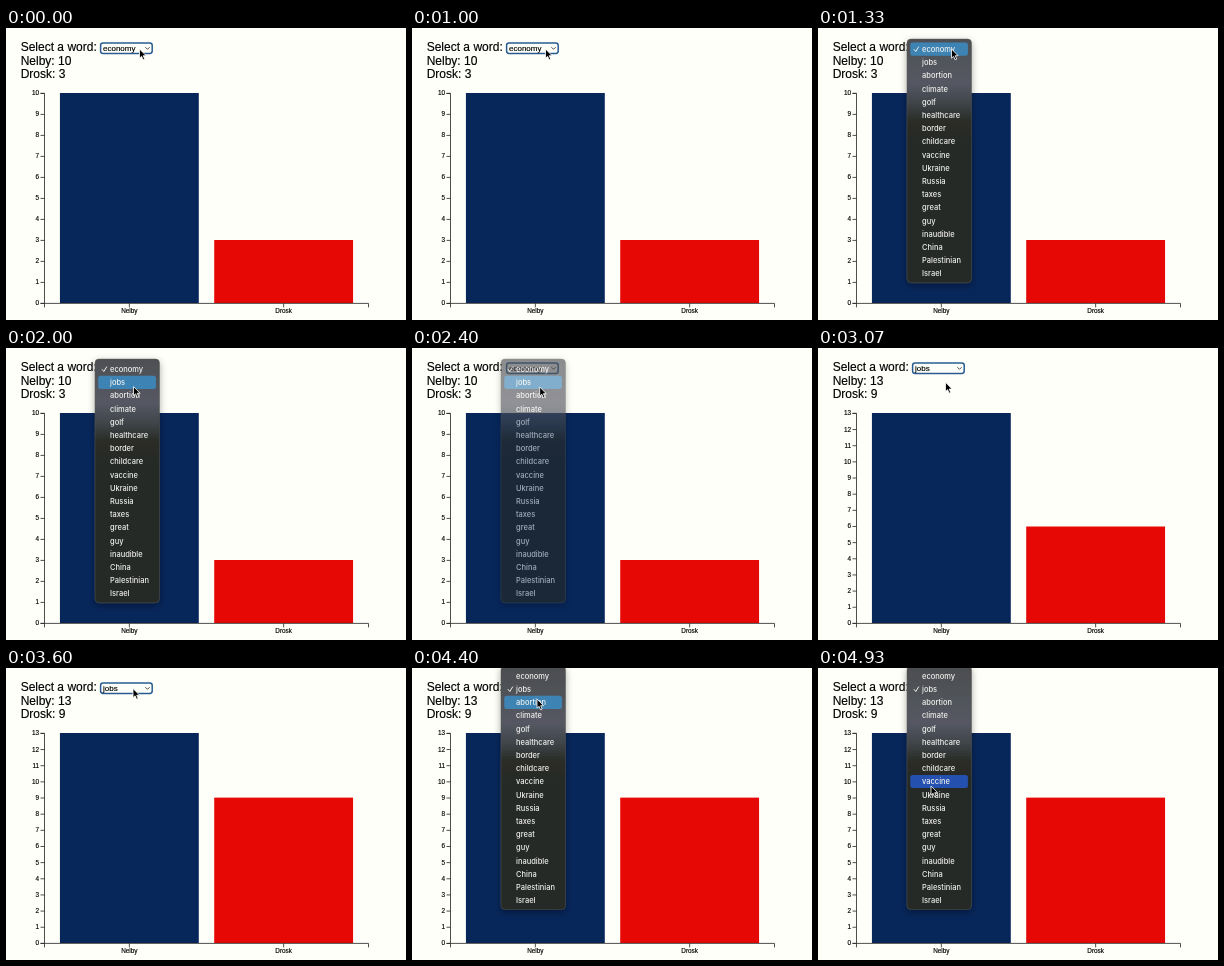
An HTML page for the animation above (4.99 s loop, 400 by 292 pixels).

```html
<!DOCTYPE html>
<html lang="en">
<head>
<meta charset="utf-8">
<title>Word counts</title>
<style>
  html, body { margin: 0; width: 100%; height: 100%; overflow: hidden; background: #fffffa; }
  svg { display: block; width: 400px; height: 292px; font-family: "Liberation Sans", Arial, sans-serif; }
  text { stroke: currentColor; stroke-width: .15; }
  .axis { font-size: 6.4px; }
  .line { fill: none; stroke: #222; stroke-width: .8; }
  .menu { font: 500 7.5px Inter, sans-serif; fill: #f1f1ee; }
  .menu text { stroke: none; }
</style>
</head>
<body>
<svg id="stage" viewBox="0 0 400 292">
  <defs>
    <linearGradient id="glass" gradientUnits="userSpaceOnUse" x1="0" y1="0" x2="0" y2="110">
      <stop offset="0" stop-color="#4c4e50"/>
      <stop offset=".5" stop-color="#555863"/>
      <stop offset=".68" stop-color="#40454a"/>
      <stop offset=".84" stop-color="#2a2d27"/>
      <stop offset="1" stop-color="#282a25"/>
    </linearGradient>
    <linearGradient id="glow" gradientUnits="userSpaceOnUse" x1="0" y1="45" x2="0" y2="100">
      <stop offset="0" stop-color="#3d84b4"/>
      <stop offset="1" stop-color="#2450b0"/>
    </linearGradient>
    <filter id="shadow" x="-30%" y="-10%" width="160%" height="120%">
      <feDropShadow dx="0" dy="2.5" stdDeviation="3.5" flood-color="#000" flood-opacity=".35"/>
    </filter>
  </defs>
</svg>
<script>
const LOOP = 4990, FRAME = 1000 / 15;
const BASE = 275, HEIGHT = 210, LEFT = 38.5, WIDTH = 324;
const LINE_Y = BASE + .4;
const ROW = 13.2;
const NAMES = ["Nelby", "Drosk"];
const WORDS = ["economy", "jobs", "abortion", "climate", "golf", "healthcare", "border",
  "childcare", "vaccine", "Ukraine", "Russia", "taxes", "great", "guy", "inaudible",
  "China", "Palestinian", "Israel"];
const COUNTS = [[10, 3], [13, 9]];
const PICKED = 2600, GROW = 1000;
const MENUS = [
  { word: 0, open: 1130, fade: 2330, close: 2530 },
  { word: 1, open: 3870, fade: LOOP, close: LOOP + 1 }
];
// time, x, y of the pointer tip
const PATH = [
  [0, 133.5, 21], [1530, 133.5, 21], [1930, 127.5, 38.5], [2530, 127.7, 39], [2870, 127.7, 39],
  [3470, 127, 20.5], [4070, 127, 20.5], [4400, 125, 31], [4730, 122, 46], [4930, 113, 118]
];

const stage = document.getElementById("stage");

function add(parent, tag, attrs = {}, text = "") {
  const node = document.createElementNS("http://www.w3.org/2000/svg", tag);
  set(node, attrs);
  node.textContent = text;
  parent.append(node);
  return node;
}

function set(node, attrs) {
  for (const key in attrs) node.setAttribute(key, attrs[key]);
}

const scaleY = (value, max) => BASE - value / max * HEIGHT;

// Header
add(stage, "text", { x: 14.7, y: 23.3, "font-size": 12 }, "Select a word:");
const totals = NAMES.map((_, i) => add(stage, "text", { x: 14.7, y: 36.9 + i * 13.5, "font-size": 12 }));
add(stage, "rect", { x: 94.6, y: 14.9, width: 51.6, height: 10.6, rx: 2.4, fill: "#fffffa", stroke: "#285c90", "stroke-width": 1.5 });
const choice = add(stage, "text", { x: 97, y: 22.9, "font-size": 8 });
add(stage, "path", { d: "M139.4 19.2l2.1 2.1 2.1-2.1", class: "line" });

// Chart
const step = WIDTH / 2.1, band = step * .9;
const bars = NAMES.map((name, i) => {
  const x = LEFT + step * (.1 + i), mid = x + band / 2;
  const bar = add(stage, "rect", { x, width: band, fill: ["#07265a", "#e60805"][i] });
  add(stage, "path", { d: `M${mid} ${LINE_Y}v4`, class: "line" });
  add(stage, "text", { x: mid, y: 284.6, class: "axis", "text-anchor": "middle" }, name);
  return bar;
});
add(stage, "path", { d: `M${LEFT} ${LINE_Y + 4}v-4h${WIDTH}v4`, class: "line" });
add(stage, "path", { d: `M${LEFT - 4} ${LINE_Y}h4v${-HEIGHT}h-4`, class: "line" });
const axes = COUNTS.map(([max]) => {
  const axis = add(stage, "g", { class: "axis", "text-anchor": "end" });
  for (let v = 0; v <= max; v++) {
    const y = scaleY(v, max);
    add(axis, "path", { d: `M${LEFT - 4} ${y + .4}h4`, class: "line" });
    add(axis, "text", { x: LEFT - 5.4, y: y + 2.4 }, v);
  }
  return axis;
});

// Pop-up menus, placed so that the chosen word covers the select box
const menus = MENUS.map(spec => {
  const first = 21.1 - spec.word * ROW;
  const group = add(stage, "g", { class: "menu" });
  add(group, "rect", { x: 89, y: first - 10, width: 64.5, height: 243.7, rx: 4, fill: "url(#glass)", stroke: "#55564c", "stroke-width": .5, filter: "url(#shadow)" });
  const mark = add(group, "rect", { x: 92.3, width: 57.6, height: ROW, rx: 2.5, fill: "url(#glow)" });
  WORDS.forEach((word, i) => add(group, "text", { x: 104, y: first + i * ROW + 2.8 }, word));
  add(group, "path", { d: "M96 21.3l1.8 2.2 3-4.9", fill: "none", stroke: "#f1f1ee", "stroke-width": 1 });
  return { ...spec, group, mark, top: first - ROW / 2 };
});

const pointer = add(stage, "path", {
  d: "M0 0V9.2L2.1 7.3 3.6 10.8 5.2 10.1 3.7 6.7H6.6Z",
  fill: "#000", stroke: "#fff", "stroke-width": .8, "stroke-linejoin": "round"
});

const smooth = u => u * u * (3 - 2 * u);
const cubic = u => u < .5 ? 4 * u ** 3 : 1 - 4 * (1 - u) ** 3;
const clamp = u => Math.min(1, Math.max(0, u));

function pointerAt(t) {
  const i = PATH.findIndex(p => p[0] > t);
  if (i < 0) return PATH[PATH.length - 1].slice(1);
  const [a, b] = [PATH[i - 1], PATH[i]];
  const u = smooth((t - a[0]) / (b[0] - a[0]));
  return [a[1] + (b[1] - a[1]) * u, a[2] + (b[2] - a[2]) * u];
}

function draw(t) {
  const word = t >= PICKED - 1 ? 1 : 0;
  const counts = COUNTS[word];
  const grown = cubic(clamp((t - PICKED) / GROW));
  choice.textContent = WORDS[word];
  axes.forEach((axis, i) => set(axis, { visibility: i === word ? "visible" : "hidden" }));
  bars.forEach((bar, i) => {
    const from = scaleY(COUNTS[0][i], COUNTS[0][0]);
    const y = from + (scaleY(COUNTS[1][i], COUNTS[1][0]) - from) * grown;
    set(bar, { y, height: BASE - y });
    totals[i].textContent = `${NAMES[i]}: ${counts[i]}`;
  });

  const [x, y] = pointerAt(t);
  set(pointer, { transform: `translate(${x} ${y})` });
  for (const menu of menus) {
    const shown = t >= menu.open && t < menu.close;
    const row = Math.floor((y - menu.top) / ROW);
    set(menu.group, {
      visibility: shown ? "visible" : "hidden",
      opacity: 1 - clamp((t - menu.fade) / (menu.close - menu.fade))
    });
    set(menu.mark, { y: menu.top + row * ROW });
  }
}

const start = performance.now();
function tick() {
  const t = (performance.now() - start) % LOOP;
  draw(Math.floor((t + 4) / FRAME) * FRAME);
  requestAnimationFrame(tick);
}
tick();
</script>
</body>
</html>
```
